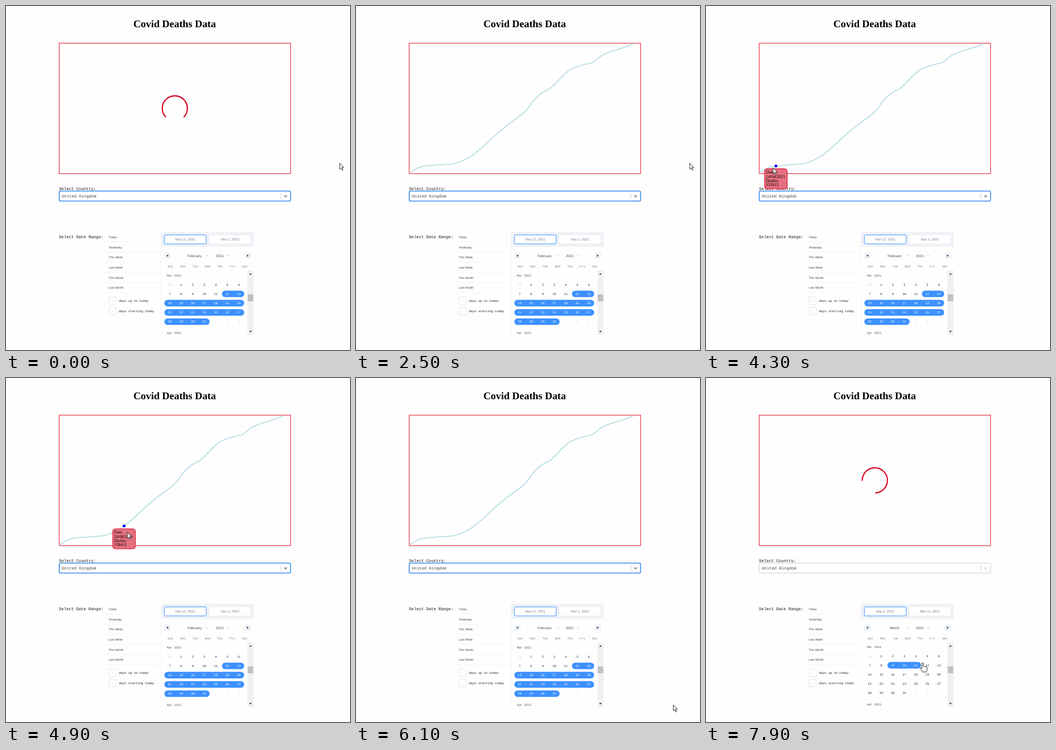
Recreate the animation shown at these times as an HTML page. Size 600 by 600 pixels, loop 8000 ms.

```html
<!DOCTYPE html>
<html lang="en">
<head>
<meta charset="utf-8">
<title>Covid Deaths Data</title>
<style>
  html, body { margin: 0; width: 100%; height: 100%; overflow: hidden; background: #fefefe; }
  svg { display: block; width: 600px; height: 600px; text-rendering: geometricPrecision; }
  .serif { font-family: "Liberation Serif", Times, serif; }
  .mono { font-family: "Liberation Mono", "Courier New", monospace; }
  .sans { font-family: "Liberation Sans", Arial, sans-serif; }
</style>
</head>
<body>
<svg id="stage" viewBox="0 0 600 600"></svg>
<script>
const LOOP = 8000, STEP = 100;
const BLUE = '#3d91ff', PALE = '#eff2f7', MUTED = '#737e84';
const LOADED = 1400, FIRST_CLICK = 6800, RELOAD = 7000, SECOND_CLICK = 7800;
const SPIN = 767, POINTER_LAG = 14;

const stage = document.getElementById('stage');

function add(tag, attrs = {}, parent = stage) {
  const el = document.createElementNS('http://www.w3.org/2000/svg', tag);
  set(el, attrs);
  parent.append(el);
  return el;
}
function set(el, attrs) {
  for (const key in attrs) el.setAttribute(key, attrs[key]);
}
function show(el, on) {
  el.style.display = on ? '' : 'none';
}
function text(str, x, y, size, font, fill = '#222', attrs = {}, parent = stage) {
  const el = add('text', { x, y, 'font-size': size, class: font, fill, ...attrs }, parent);
  el.textContent = str;
  return el;
}
function rect(x, y, width, height, attrs, parent = stage) {
  return add('rect', { x, y, width, height, ...attrs }, parent);
}
function path(d, attrs, parent = stage) {
  return add('path', { d, fill: 'none', ...attrs }, parent);
}
const MIDDLE = { 'text-anchor': 'middle' };
const clamp = (v, lo = 0, hi = 1) => Math.min(hi, Math.max(lo, v));

// Data curve: a smooth line through its bends
const CURVE = [
  [93, 291], [110, 281.6], [122, 279.006], [160, 276], [176, 273.6], [205, 258.8],
  [255, 215], [295, 184], [310, 164.5], [325, 151], [340, 142.5], [367, 116],
  [380, 108], [402, 101.149], [412, 98.5], [432, 84.5], [471, 71], [485, 65.5]
];
const FIRST_X = 93, LAST_X = 485;
function slope(i) {
  const a = CURVE[Math.max(i - 1, 0)], b = CURVE[Math.min(i + 1, CURVE.length - 1)];
  return (b[1] - a[1]) / (b[0] - a[0]);
}
function curveY(x) {
  let i = 0;
  while (i < CURVE.length - 2 && x >= CURVE[i + 1][0]) i++;
  const [x0, y0] = CURVE[i], [x1, y1] = CURVE[i + 1];
  const w = x1 - x0, u = (x - x0) / w, v = 1 - u;
  return y0 * (1 + 2 * u) * v * v + y1 * u * u * (3 - 2 * u)
       + w * u * v * (slope(i) * v - slope(i + 1) * u);
}
function curvePath() {
  let d = '';
  for (let x = FIRST_X; x <= LAST_X; x++) d += (d ? 'L' : 'M') + x + ' ' + curveY(x).toFixed(2);
  return d;
}

// Heading and chart
text('Covid Deaths Data', 294.2, 37, 17.9, 'serif', '#000', { ...MIDDLE, 'font-weight': 'bold' });
const frame = rect(92.8, 64.8, 403.6, 227.6, { fill: 'none', 'stroke-width': 1.3 });
const line = path(curvePath(), { stroke: '#b2dce2', 'stroke-width': 1.6, pathLength: 1 });
const spinner = path('M279 194A21.9 21.9 0 1 1 310 194', { stroke: '#d8031f', 'stroke-width': 2.1 });

// Country picker
text('Select Country:', 92.5, 321.2, 7.17, 'mono', '#111');
const picker = rect(92.8, 322.8, 403.6, 17.4, { rx: 2.5, fill: '#fff' });
text('United Kingdom', 97.3, 334, 7.2, 'mono', '#444');
path('M479.5 327V336', { stroke: '#ccc', 'stroke-width': 0.9 });
const chevron = path('M485.2 330.4L487.6 333L490 330.4', { 'stroke-width': 1.3 });

// Preset ranges
text('Select Date Range:', 92.3, 405, 7.18, 'mono', '#111');
['Today', 'Yesterday', 'This Week', 'Last Week', 'This Month', 'Last Month'].forEach((label, i) => {
  const y = 404.9 + i * 17.65;
  text(label, 179, y, 5.25, 'sans', '#444');
  path(`M172 ${y + 6.9}H270`, { stroke: PALE, 'stroke-width': 0.9 });
});
['days up to today', 'days starting today'].forEach((label, i) => {
  const y = 507.7 + i * 17.8;
  rect(179.3, y, 12.8, 13.2, { rx: 1.5, fill: '#fff', stroke: '#dfe3ea', 'stroke-width': 0.9 });
  text('-', 185.7, y + 8.2, 5.4, 'mono', '#555', MIDDLE);
  text(label, 197, y + 8.6, 5.4, 'mono', '#221520');
});
path('M270.7 394V574', { stroke: PALE, 'stroke-width': 0.9 });

// Calendar header
rect(271, 394, 161, 26, { fill: PALE });
function dateField(x) {
  return {
    box: rect(x, 399.2, 73, 15.8, { rx: 2.2, fill: '#fff' }),
    label: text('', x + 36.5, 409.4, 5.95, 'sans', MUTED, MIDDLE)
  };
}
const startField = dateField(276.2), endField = dateField(354.2);
function setField(field, value, active) {
  field.label.textContent = value;
  set(field.box, { stroke: active ? BLUE : '#e3e8ee', 'stroke-width': active ? 1 : 0.6 });
}
[276, 416.5].forEach(x => rect(x, 430, 11, 11, { rx: 2.2, fill: PALE }));
path('M279.6 435.5L283 433.4V437.6Z', { fill: '#34495e' });
path('M423.6 435.5L420.2 433.4V437.6Z', { fill: '#34495e' });
const month = text('', 329, 437.7, 6.1, 'sans', '#3e484f', MIDDLE);
text('2021', 373, 437.7, 6.1, 'sans', '#3e484f', MIDDLE);
[351.8, 387.8].forEach(x =>
  path(`M${x - 1.8} 434.8L${x} 436.5L${x + 1.8} 434.8`, { stroke: '#a5adb3', 'stroke-width': 0.8 }));
['Sun', 'Mon', 'Tue', 'Wed', 'Thu', 'Fri', 'Sat'].forEach((day, i) =>
  text(day, 286.7 + i * 21.65, 456, 5.4, 'mono', MUTED, MIDDLE));

// Month grid
const clip = add('clipPath', { id: 'days' });
rect(271, 461, 150, 113, {}, clip);
const grid = add('g', {}, add('g', { 'clip-path': 'url(#days)' }));
text('Mar 2021', 280.4, 472, 5.4, 'mono', '#555', {}, grid);
text('Apr 2021', 280.4, 572, 5.4, 'mono', '#555', {}, grid);
const colX = c => 285.6 + c * 20.1;
const rowY = r => 486 + r * 16.15;
const bars = [0, 1, 2, 3, 4].map(r => rect(0, rowY(r) - 5.7, 0, 11.4, { rx: 5.7, fill: BLUE }, grid));
const cells = [];
for (let i = 0; i < 35; i++) {
  const day = i === 0 ? 28 : i > 31 ? i - 31 : i;
  cells.push(text(day, colX(i % 7), rowY(Math.floor(i / 7)) + 1.8, 5.4, 'mono', '', MIDDLE, grid));
}
function selectDays(from, to) {
  bars.forEach((bar, r) => {
    const a = Math.max(from, r * 7), b = Math.min(to, r * 7 + 6);
    show(bar, a <= b);
    if (a <= b) set(bar, { x: colX(a % 7) - 9.4, width: (b - a) * 20.1 + 18.6 });
  });
  cells.forEach((cell, i) => {
    const inMonth = i > 0 && i < 32, chosen = i >= from && i <= to;
    set(cell, { fill: chosen ? '#fff' : inMonth ? '#1d2429' : '#d0d6da' });
  });
}
rect(421, 461, 11, 113, { fill: '#f1f1f1' });
rect(421.6, 503, 9.6, 12, { fill: '#c1c1c1' });
path('M424 468.6L426.4 466L428.8 468.6Z', { fill: '#333' });
path('M424 566.8L426.4 569.4L428.8 566.8Z', { fill: '#333' });

// Tooltip and cursors
const dot = add('circle', { r: 2.5, fill: '#00f' });
const tip = add('g');
rect(0.7, 0.7, 39.4, 34.8, { rx: 4.5, fill: '#e5707f', stroke: '#e02545', 'stroke-width': 1.3 }, tip);
const tipLines = [0, 1, 2, 3].map(i => text('', 3, 9.1 + i * 7.3, 7.35, 'serif', '#000', {}, tip));
tipLines[0].textContent = 'Date:';
tipLines[2].textContent = 'Deaths:';

const cursorStyle = { fill: '#fff', stroke: '#222', 'stroke-width': 0.9, 'stroke-linejoin': 'round' };
const arrow = path('M0 0V10.5L2.4 8.3L4.1 12.4L5.8 11.7L4.1 7.7H7.3Z', cursorStyle);
const hand = path('M-1.3 .5Q0 -1 1.3 .5V6Q2.8 5 3.8 6.4Q5.2 5.6 6 7Q7.6 6.6 7.8 8.2V11.5Q7.6 13.5 6.4 15.8' +
  'H0Q-1.5 13 -4.2 10.2Q-4.8 8.2 -2.8 8.6L-1.3 9.8Z', cursorStyle);

// Pointer stops: time, x, y
const STOPS = [
  [2700, 582, 274], [3200, 471, 208], [3300, 471, 206], [4300, 117, 282], [4500, 94, 285],
  [4600, 94, 285], [5400, 407.5, 243], [5700, 491, 288], [6000, 590, 582],
  [6700, 334, 499], [7300, 334, 499], [7700, 378, 497]
];
function pointerAt(t) {
  const i = STOPS.findIndex(s => s[0] > t);
  if (i <= 0) return STOPS.at(i).slice(1);
  const [t0, x0, y0] = STOPS[i - 1], [t1, x1, y1] = STOPS[i];
  const u = (t - t0) / (t1 - t0);
  return [x0 + (x1 - x0) * u, y0 + (y1 - y0) * u];
}

function drawChart(t) {
  const loading = t < LOADED || t >= RELOAD;
  set(frame, { stroke: loading ? '#e3425a' : '#ee4459' });

  const p = t >= RELOAD ? 0 : clamp((t - LOADED) / 1050);
  const drawn = (1 - Math.cos(Math.PI * p)) / 2;
  show(line, drawn > 0);
  set(line, { 'stroke-dasharray': drawn < 1 ? `${drawn} 2` : 'none' });

  const fade = t >= RELOAD ? 1 : clamp(1 - (t - 1350) / 360);
  const turn = (t >= RELOAD ? t - 7041 : t) / SPIN * 360;
  show(spinner, fade > 0);
  set(spinner, { opacity: fade, transform: `rotate(${turn} 294.5 178.5)` });
}

function drawPointer(t) {
  const [x, y] = pointerAt(t);
  const overDays = x > 276 && x < 416 && y > 478 && y < 557;
  const at = `translate(${x} ${y})`;
  show(hand, overDays);
  show(arrow, !overDays);
  set(hand, { transform: at });
  set(arrow, { transform: at });

  const hover = x > 92 && x < 497 && y > 64 && y < 293;
  show(dot, hover);
  show(tip, hover);
  if (!hover) return;
  const markX = clamp(Math.round(pointerAt(t - POINTER_LAG)[0]), FIRST_X, LAST_X);
  const markY = curveY(markX);
  set(dot, { cx: markX, cy: markY });
  set(tip, { transform: `translate(${markX - 20.5} ${markY + 4.3})` });
  const date = new Date(Date.UTC(2021, 2, 12 + Math.round((markX - FIRST_X) * 1.481)));
  tipLines[1].textContent = date.toISOString().slice(0, 10).split('-').reverse().join('/');
  tipLines[3].textContent = Math.round(208500 - (markY - 71) * 262.43);
}

function drawForm(t) {
  const clicked = t >= FIRST_CLICK, done = t >= SECOND_CLICK;
  set(picker, { stroke: clicked ? '#c6cad0' : '#3f8fee', 'stroke-width': clicked ? 1 : 1.6 });
  set(chevron, { stroke: clicked ? '#ccc' : '#666' });
  setField(startField, clicked ? 'Mar 9, 2021' : 'Mar 12, 2021', !clicked || done);
  setField(endField, done ? 'Mar 11, 2021' : clicked ? 'Mar 9, 2021' : 'Nov 1, 2022', clicked && !done);
  month.textContent = clicked ? 'March' : 'February';
  set(grid, { transform: `translate(0 ${clicked ? -1.2 : 0})` });
  if (clicked) selectDays(9, done ? 11 : 9);
  else selectDays(12, 31);
}

function render() {
  const t = Math.floor((performance.now() + 20) / STEP) * STEP % LOOP;
  drawChart(t);
  drawForm(t);
  drawPointer(t);
  requestAnimationFrame(render);
}
render();
</script>
</body>
</html>
```
